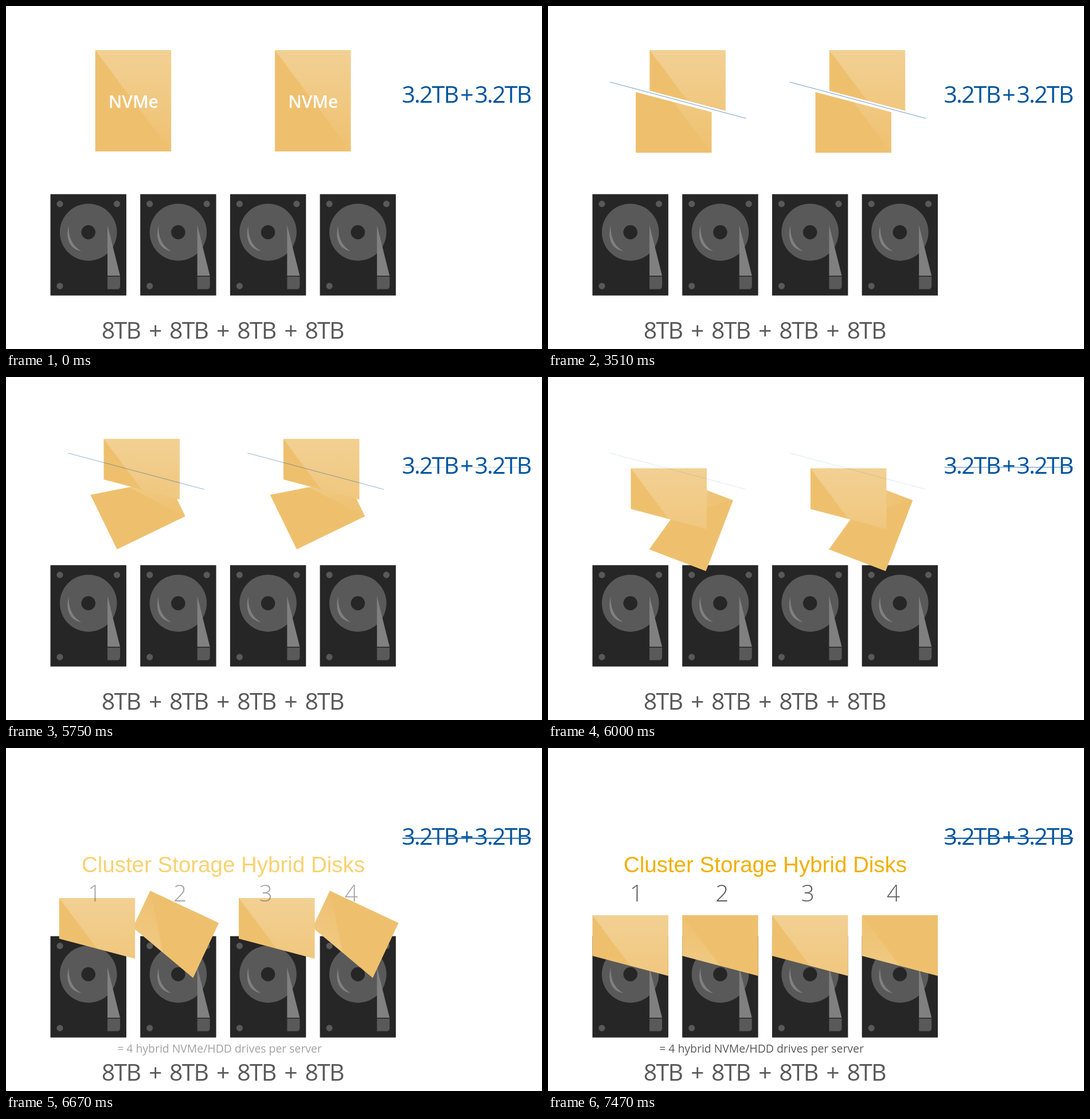
Write an HTML page with a canvas that moves like this. It is 935 px wide and 599 px high and loops after 9560 ms.

```html
<!DOCTYPE html>
<html lang="en">
<head>
<meta charset="utf-8">
<title>Hybrid disks</title>
<style>
html, body { margin: 0; width: 100%; height: 100%; overflow: hidden; background: #fff; }
canvas { display: block; }
</style>
</head>
<body>
<canvas id="stage" width="935" height="599"></canvas>
<script>
const ctx = document.getElementById('stage').getContext('2d');
const LOOP = 9560, PITCH = 156.7, W = 132.4, H = 177;
const SANS = '"Open Sans", "Noto Sans", sans-serif';
const ARIAL = '"Liberation Sans", Arial, sans-serif';
const GREY = '#595959', BLUE = '#00549f', DARK = '#262626', LIGHT = '#808080';

// Card outline cut by a slanted line; the sheen starts at the diagonal.
const CUT_L = 71, CUT_R = 106, MID = [66.2, 88.5];
const UPPER = {
  body: [[0, 0], [W, 0], [W, CUT_R], [0, CUT_L]],
  sheen: [[0, 0], [W, 0], [W, CUT_R], MID]
};
const LOWER = {
  body: [[0, CUT_L], [W, CUT_R], [W, H], [0, H]],
  sheen: [MID, [W, CUT_R], [W, H]]
};
const WHOLE = {
  body: [[0, 0], [W, 0], [W, H], [0, H]],
  sheen: [[0, 0], [W, 0], [W, H]]
};
const LOWER_MID = (CUT_L + H) / 2;

const sheenFill = ctx.createLinearGradient(0, 0, 0, H);
sheenFill.addColorStop(0, 'rgba(255,255,255,.26)');
sheenFill.addColorStop(1, 'rgba(255,255,255,.01)');

const clamp = v => Math.min(1, Math.max(0, v));
const lerp = (a, b, k) => a + (b - a) * k;
const bezier = (a, b, s) => 3 * a * s * (1 - s) ** 2 + 3 * b * s * s * (1 - s) + s ** 3;

// cubic-bezier(.26, .1, .33, 1)
function ease(x) {
  if (x <= 0 || x >= 1) return clamp(x);
  let lo = 0, hi = 1;
  for (let i = 0; i < 24; i++) {
    const s = (lo + hi) / 2;
    if (bezier(.26, .33, s) < x) lo = s; else hi = s;
  }
  return bezier(.1, 1, lo);
}

function polygon(points, fill) {
  ctx.fillStyle = fill;
  ctx.beginPath();
  points.forEach(p => ctx.lineTo(...p));
  ctx.fill();
}

function circle(x, y, r, fill) {
  ctx.fillStyle = fill;
  ctx.beginPath();
  ctx.arc(x, y, r, 0, 7);
  ctx.fill();
}

function line(x1, y1, x2, y2, width, alpha) {
  ctx.globalAlpha = alpha;
  ctx.strokeStyle = BLUE;
  ctx.lineWidth = width;
  ctx.beginPath();
  ctx.moveTo(x1, y1);
  ctx.lineTo(x2, y2);
  ctx.stroke();
  ctx.globalAlpha = 1;
}

function text(str, x, y, font, fill, { align = 'center', spacing = 0, alpha = 1 } = {}) {
  ctx.globalAlpha = alpha;
  ctx.font = font;
  ctx.fillStyle = fill;
  ctx.textAlign = align;
  ctx.letterSpacing = spacing + 'px';
  ctx.fillText(str, x, y);
  ctx.globalAlpha = 1;
}

function piece(shape, x, y, angle = 0, pivotY = 0) {
  ctx.save();
  ctx.translate(x, y);
  if (angle) {
    ctx.translate(W / 2, pivotY);
    ctx.rotate(angle);
    ctx.translate(-W / 2, -pivotY);
  }
  polygon(shape.body, '#eec06e');
  polygon(shape.sheen, sheenFill);
  ctx.restore();
}

function disk(x) {
  ctx.save();
  ctx.translate(x, 328.6);
  ctx.fillStyle = DARK;
  ctx.fillRect(0, 0, W, H);
  circle(66.2, 66.5, 49.8, GREY);
  circle(66.2, 66.5, 12.3, DARK);
  for (const [sx, sy] of [[16.5, 17], [116, 17], [16.5, 160.5]]) circle(sx, sy, 5.6, GREY);
  ctx.fillStyle = LIGHT;
  ctx.beginPath();
  ctx.moveTo(32, 55);
  ctx.bezierCurveTo(26, 75, 32, 96, 54, 99.5);
  ctx.bezierCurveTo(38, 91, 31, 74, 32, 55);
  ctx.fill();
  polygon([[99.5, 54], [121.5, 142.3], [99.5, 142.3]], LIGHT);
  ctx.fillStyle = GREY;
  ctx.beginPath();
  ctx.roundRect(99.5, 144, 22, 22, [0, 0, 5, 0]);
  ctx.fill();
  ctx.restore();
}

function draw(t) {
  const split = clamp((t - 2600) / 1990), merge = clamp((t - 5470) / 2000);
  const s = ease(split), m = ease(merge);
  const reveal = 1 - (1 - clamp((merge - .4) / .6)) ** 2;

  ctx.fillStyle = '#fff';
  ctx.fillRect(0, 0, 935, 599);
  for (let i = 0; i < 4; i++) disk(77.5 + i * PITCH);

  for (const dx of [0, 2 * PITCH]) {
    if (s === 0) {
      piece(WHOLE, 155.7 + dx, 77);
    } else {
      const lowerX = lerp(155.7 - 3.7 * s, 77.5 + PITCH, m);
      const lowerY = lerp(77 + 3.2 * s, 292 + 53 - LOWER_MID, m);
      piece(LOWER, lowerX + dx, lowerY, -Math.PI * m, LOWER_MID);
      piece(UPPER, lerp(155.7 + 30.5 * s, 77.5, m) + dx, lerp(77, 292, m));
    }
    text('NVMe', 222.3 + dx, 177.5, `600 30px ${SANS}`, '#fff', { alpha: clamp(1 - split / .4) });
    line(108 + dx, 132.8, 345.5 + dx, 196.2, .8, s * clamp(1 - merge / .32));
  }

  const big = `41px ${SANS}`, tight = { spacing: -1.8 };
  for (const x of [739.5, 866.5]) text('3.2TB', x, 168.5, big, BLUE, tight);
  text('+', 804, 168.5, big, BLUE);
  line(691.5, 157.8, 916, 157.8, 2, m);

  for (let i = 0; i < 4; i++) {
    text('8TB', 200.5 + i * 118.2, 581, big, GREY, tight);
    if (i < 3) text('+', 260.6 + i * 118.2, 581, big, GREY);
    text(i + 1, 154.5 + i * 149.3, 268, `300 41px ${SANS}`, GREY, { alpha: reveal });
  }
  text('Cluster Storage Hybrid Disks', 379, 217, `38.5px ${ARIAL}`, '#f2af00', { alpha: reveal });
  text('= 4 hybrid NVMe/HDD drives per server', 372.5, 532, `19.4px ${SANS}`, GREY, { alpha: reveal });
}

const start = performance.now();
function tick() {
  draw((performance.now() - start) % LOOP);
  requestAnimationFrame(tick);
}
tick();
</script>
</body>
</html>
```
